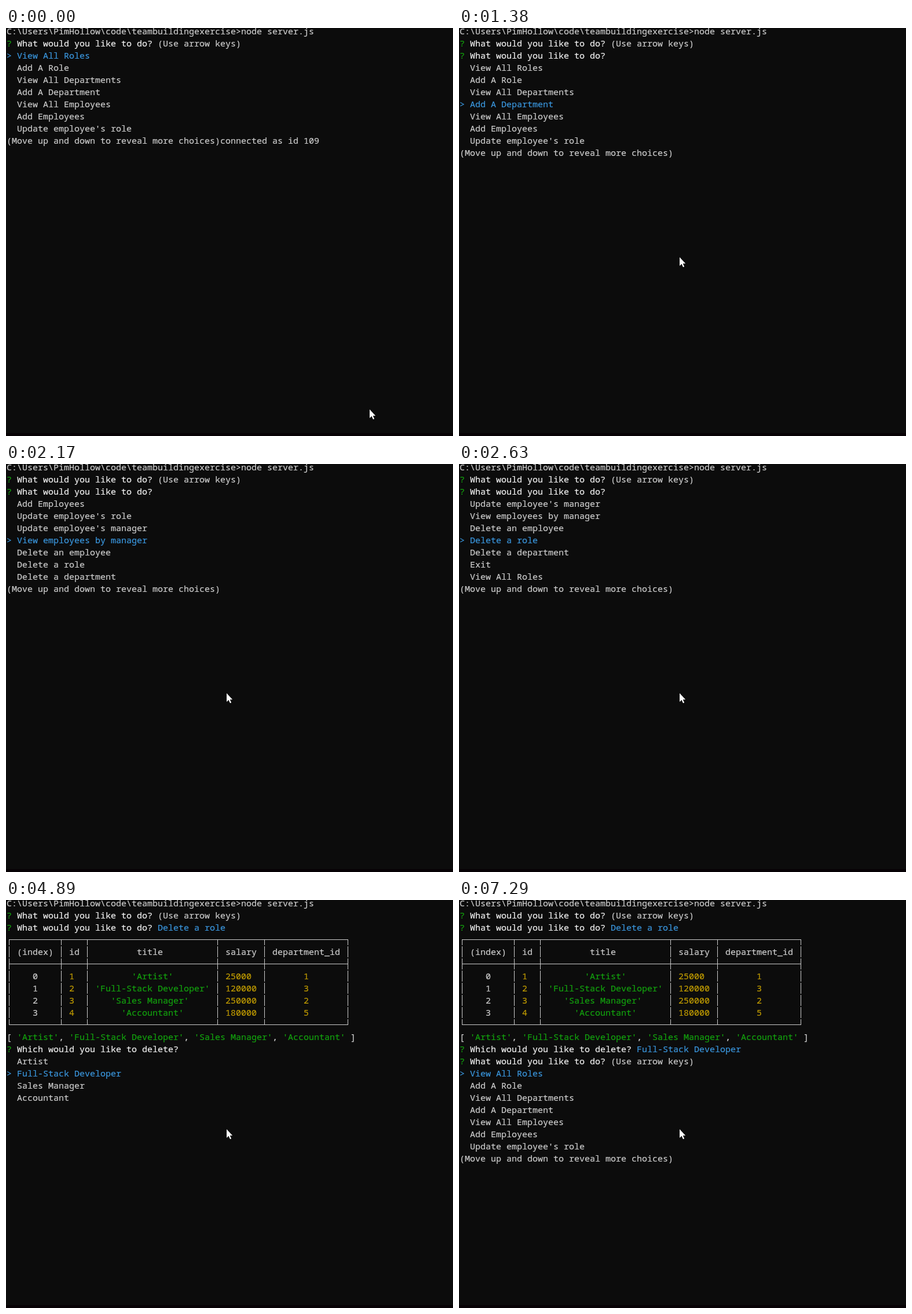
Recreate the animation shown at these times as an HTML page. Size 772 by 705 pixels, loop 8000 ms.

```html
<!DOCTYPE html>
<html lang="en">
<head>
<meta charset="utf-8">
<title>Role manager in a terminal</title>
<style>
  html, body { margin: 0; width: 100%; height: 100%; overflow: hidden; background: #0c0c0c; }
  svg { display: block; width: 772px; height: 705px; }
  text { font: 15px "Noto Sans Mono", "DejaVu Sans Mono", monospace; white-space: pre; stroke-width: 0.2px; }
</style>
</head>
<body>
<svg viewBox="0 0 772 705">
  <rect width="772" height="705" fill="#0c0c0c"/>
  <rect y="700" width="772" height="5" fill="#070205"/>
  <path id="grid" fill="#ccc" shape-rendering="crispEdges"/>
  <g id="screen"></g>
  <path id="mouse" fill="#fff" stroke="#000" stroke-width="1" paint-order="stroke"
    d="M0 0V15L3.5 11.8L6 17.3L8.2 16.4L5.8 11H10.2Z"/>
</svg>
<script>
const LOOP = 8000, LEFT = 1, CELL = 9, ROW = 21, PAGE = 7;
const GRAY = '#cccccc', WHITE = '#f2f2f2', GREEN = '#13a10e', BLUE = '#3a96dd', GOLD = '#c19c00';

const menu = ['View All Roles', 'Add A Role', 'View All Departments', 'Add A Department',
  'View All Employees', 'Add Employees', "Update employee's role", "Update employee's manager",
  'View employees by manager', 'Delete an employee', 'Delete a role', 'Delete a department', 'Exit'];
const roles = [
  ['Artist', 25000, 1],
  ['Full-Stack Developer', 120000, 3],
  ['Sales Manager', 250000, 2],
  ['Accountant', 180000, 5]
];
const titles = roles.map(role => role[0]);
const bars = [0, 10, 15, 40, 49, 65];
const TASK = 'What would you like to do?', DELETE = 'Which would you like to delete?';
const KEYS = '(Use arrow keys)', MORE = '(Move up and down to reveal more choices)';

const screen = document.getElementById('screen');
const grid = document.getElementById('grid');
const mouse = document.getElementById('mouse');

function put(row, col, text, color = GRAY) {
  const el = document.createElementNS('http://www.w3.org/2000/svg', 'text');
  el.setAttribute('x', LEFT + col * CELL);
  el.setAttribute('y', 11 + row * ROW);
  el.setAttribute('fill', color);
  el.setAttribute('stroke', color);
  el.textContent = text;
  screen.append(el);
}

function ask(row, question, tail = '', color = GRAY) {
  put(row, 0, '?', GREEN);
  put(row, 2, question, WHITE);
  put(row, 3 + question.length, tail, color);
}

function list(row, items, selected) {
  items.forEach((item, i) => {
    const color = i === selected ? BLUE : GRAY;
    if (i === selected) put(row + i, 0, '>', color);
    put(row + i, 2, item, color);
  });
}

// The pointer stops on the fourth line, then the choices scroll under it.
function taskList(row, selected, note = '') {
  const first = Math.max(0, selected - 3);
  const items = Array.from({ length: PAGE }, (_, i) => menu[(first + i) % menu.length]);
  list(row, items, selected - first);
  put(row + PAGE, 0, MORE + note);
}

function cell(row, column, value, color) {
  const left = bars[column] + 1, width = bars[column + 1] - left;
  const text = String(value);
  put(row, left + Math.floor((width - text.length) / 2), text, color);
}

function table() {
  ['(index)', 'id', 'title', 'salary', 'department_id'].forEach((name, i) => cell(4, i, name));
  roles.forEach(([title, salary, dept], i) => {
    const row = 6 + i;
    cell(row, 0, i, GRAY);
    cell(row, 1, i + 1, GOLD);
    cell(row, 2, `'${title}'`, GREEN);
    cell(row, 3, salary, GOLD);
    cell(row, 4, dept, GOLD);
  });
  let col = 2;
  put(11, 0, '[');
  titles.forEach((title, i) => {
    const quoted = `'${title}'`;
    put(11, col, quoted, GREEN);
    col += quoted.length;
    put(11, col, i < titles.length - 1 ? ',' : ' ]');
    col += 2;
  });
}

function gridPath() {
  const barX = bar => LEFT + bar * CELL + 4;
  const from = barX(bars[0]), to = barX(bars.at(-1)) + 1;
  let d = '';
  for (const y of [68, 110, 215]) d += `M${from} ${y}H${to}v1H${from}z`;
  for (const bar of bars) {
    for (let row = 3; row <= 10; row++) {
      const mid = 6 + row * ROW;
      const top = row === 3 ? 68 : mid - 10;
      const end = row === 10 ? 216 : mid + 9;
      d += `M${barX(bar)} ${top}h1V${end}h-1z`;
    }
  }
  return d;
}
grid.setAttribute('d', gridPath());

function start() {
  taskList(2, 0, 'connected as id 109');
}
const pick = selected => () => {
  ask(2, TASK);
  taskList(3, selected);
};
const erase = (selected, hint) => () => {
  ask(2, TASK, 'Delete a role', BLUE);
  table();
  ask(12, DELETE, hint);
  list(13, titles, selected);
};
function finish() {
  ask(2, TASK, 'Delete a role', BLUE);
  table();
  ask(12, DELETE, titles[1], BLUE);
  ask(13, TASK, KEYS);
  taskList(14, 0);
}

const steps = [[0, start]];
[920, 1150, 1380, 1530, 1700, 1850, 2000, 2170, 2400, 2630]
  .forEach((time, i) => steps.push([time, pick(i + 1)]));
steps.push([3330, erase(0, KEYS)], [4890, erase(1)], [5820, erase(2)], [6280, erase(1)], [7290, finish]);

const moves = [[0, 628, 659], [70, 548, 572], [150, 436, 455], [230, 368, 383], [310, 381, 396]];
const at = (keys, t) => keys.findLast(key => key[0] <= t);

let shown;
function draw(t) {
  const [, x, y] = at(moves, t);
  mouse.setAttribute('transform', `translate(${x} ${y})`);
  const step = at(steps, t);
  if (step === shown) return;
  shown = step;
  screen.replaceChildren();
  put(0, 0, 'C:\\Users\\PimHollow\\code\\teambuildingexercise>node server.js');
  ask(1, TASK, KEYS);
  step[1]();
  grid.style.display = step[0] >= 3330 ? '' : 'none';
}

const begin = performance.now();
function tick() {
  draw((performance.now() - begin) % LOOP);
  requestAnimationFrame(tick);
}
tick();
</script>
</body>
</html>
```
